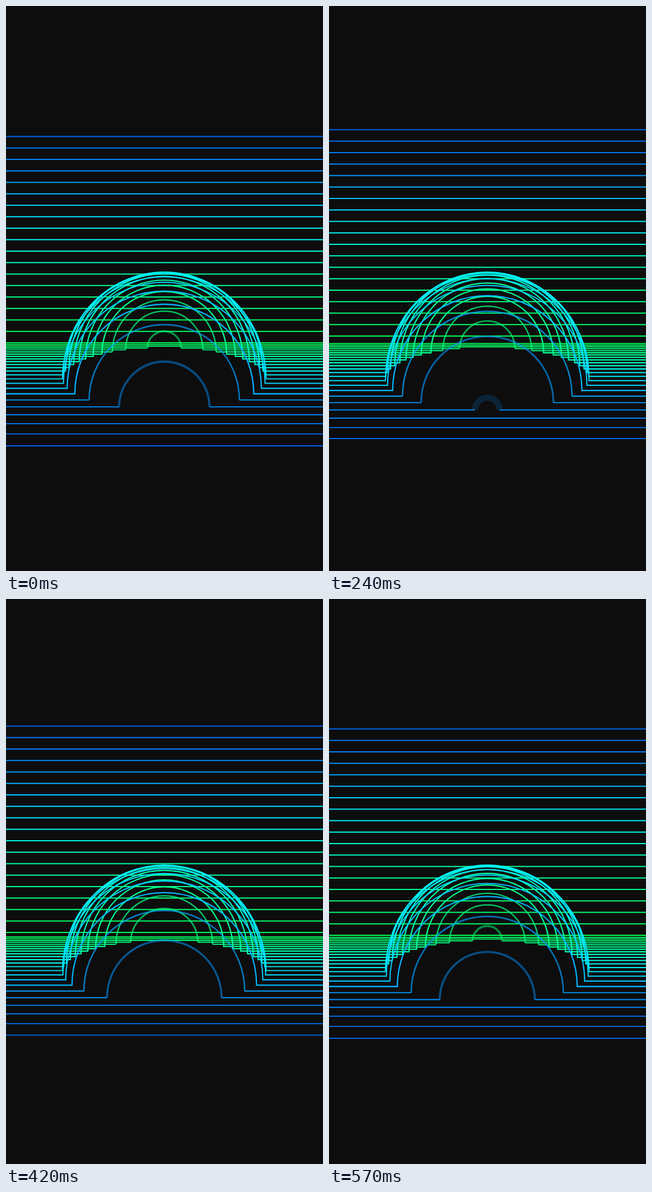
Animation of 561 by 998 pixels, one loop 0.6 s. Source, as an HTML page with a canvas:

```html
<!DOCTYPE html>
<html lang="en">
<head>
<meta charset="utf-8">
<title>Line dome</title>
<style>
  html, body { margin: 0; width: 100%; height: 100%; overflow: hidden; background: #0d0d0d; }
  canvas { display: block; }
</style>
</head>
<body>
<canvas id="stage" width="561" height="998"></canvas>
<script>
const ctx = document.getElementById('stage').getContext('2d');
const W = 561, H = 998, CX = 280.1;
const LOOP = 600, STEP = 30, SHUTTER = 15;
const TOP = 217, BOTTOM = 780;

// Wall: evenly spaced lines sliding down to the fold.
const FOLD = 595.1, GAP = 20.25;
// Floor: perspective plane; depth is measured in line gaps.
const HORIZON = 499, DROP = 3373, FOLD_DEPTH = 35.13;
// Sphere resting in the floor.
const SPHERE = { depth: 24.03, r2: 69.4, scale: 488 };
const LINE = 1.9;

// Colour by distance from the fold, 0 to 1.
const RAMP = [
  [0, 0, 255, 85], [0.33, 0, 255, 165], [0.52, 0, 250, 250],
  [0.65, 0, 215, 255], [0.8, 4, 150, 255], [1, 0, 98, 238]
];

function colour(d) {
  d = Math.min(d, 1);
  const i = Math.max(1, RAMP.findIndex(stop => stop[0] >= d));
  const a = RAMP[i - 1], b = RAMP[i];
  const u = (d - a[0]) / (b[0] - a[0]);
  const rgb = [1, 2, 3].map(c => Math.round(a[c] + (b[c] - a[c]) * u));
  return `rgb(${rgb})`;
}

function radius(depth) {
  const off = depth - SPHERE.depth;
  return SPHERE.scale * Math.sqrt(Math.max(0, SPHERE.r2 - off * off)) / depth;
}

function segment(x0, x1, y) {
  ctx.beginPath();
  ctx.moveTo(x0, y);
  ctx.lineTo(x1, y);
  ctx.stroke();
}

function wallLine(w) {
  ctx.strokeStyle = colour(w / 18.3);
  ctx.lineWidth = 2;
  segment(0, W, FOLD - GAP * w);
}

function floorLine(w) {
  const depth = FOLD_DEPTH + w;
  const y = HORIZON + DROP / depth;
  const blur = SHUTTER / LOOP / 2;
  const r0 = radius(depth + blur), r1 = radius(depth - blur);
  const r = (r0 + r1) / 2;
  ctx.strokeStyle = colour(-w / 23);
  ctx.lineWidth = LINE;
  if (r < 1) return segment(0, W, y);

  const width = LINE + Math.abs(r1 - r0);
  if (width < 2.4) {
    ctx.lineWidth = width;
    ctx.beginPath();
    ctx.moveTo(0, y);
    ctx.lineTo(CX - r, y);
    ctx.arc(CX, y, r, Math.PI, 0);
    ctx.lineTo(W, y);
    ctx.stroke();
    return;
  }
  // A fast-changing arc smears into a wide, faint band.
  segment(0, CX - r, y);
  segment(CX + r, W, y);
  ctx.globalAlpha = LINE / width;
  ctx.lineWidth = width;
  ctx.beginPath();
  ctx.arc(CX, y, r, Math.PI, 0);
  ctx.stroke();
  ctx.globalAlpha = 1;
}

function draw(now) {
  const phase = Math.floor((now % LOOP) / STEP) * STEP / LOOP;
  ctx.fillStyle = '#0d0d0d';
  ctx.fillRect(0, 0, W, H);
  ctx.save();
  ctx.beginPath();
  ctx.rect(0, TOP, W, BOTTOM - TOP);
  ctx.clip();
  for (let i = 19; i >= -23; i--) {
    const w = i - phase;
    if (w >= 0) wallLine(w);
    else floorLine(w);
  }
  ctx.restore();
}

function tick(now) {
  draw(now);
  requestAnimationFrame(tick);
}
draw(0);
requestAnimationFrame(tick);
</script>
</body>
</html>
```
